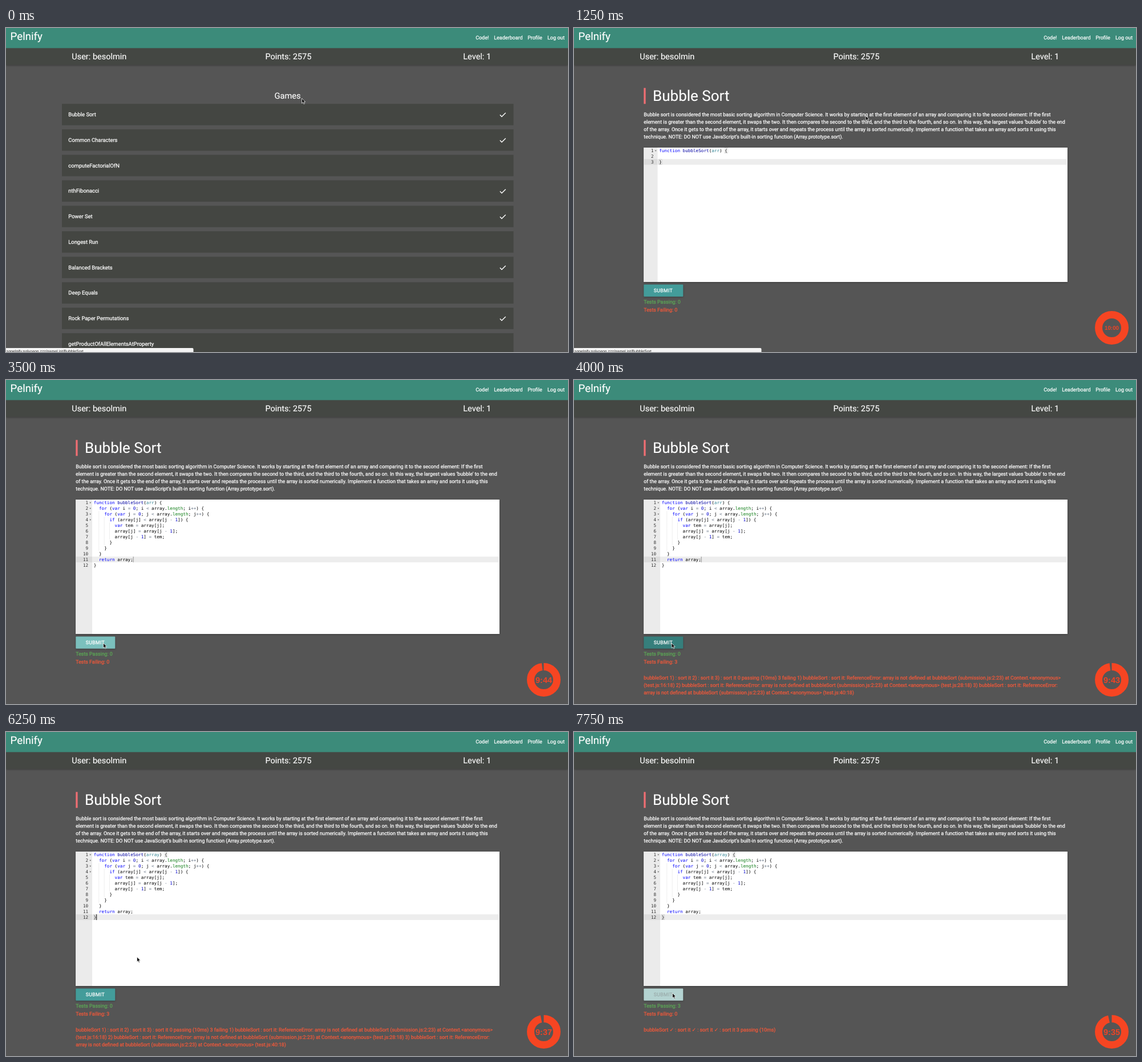
These frames come from a looping animation (985 px wide and 569 px high, 8000 ms). An HTML page:

```html
<!DOCTYPE html>
<html lang="en">
<head>
<meta charset="utf-8">
<title>Coding game</title>
<style>
html, body { margin: 0; width: 100%; height: 100%; overflow: hidden; background: #555; }
svg { display: block; width: 985px; height: 569px; }
text { white-space: pre; font-family: Roboto, sans-serif; fill: #fff; stroke: currentColor; stroke-width: .15px; text-rendering: geometricPrecision; }
.small { stroke-width: .25px; }
.code { font-family: "DejaVu Sans Mono", monospace; font-size: 7.65px; fill: #000; stroke: none; }
.num { fill: #333; text-anchor: end; }
.kw { fill: #00f; } .fn { fill: #0000a2; } .lit { fill: #0000cd; }
.prop { fill: #06780e; } .op { fill: #687687; } .arg { fill: #318495; }
.status { font-family: "Liberation Sans", Arial, sans-serif; font-size: 6.9px; fill: #222; stroke: none; }
.clock { font-family: "Liberation Sans", Arial, sans-serif; font-weight: bold; fill: #f04325; stroke: none; text-anchor: middle; }
.lift { filter: drop-shadow(0 1.2px 1.5px rgba(0,0,0,.3)); }
</style>
</head>
<body>
<svg viewBox="0 0 985 569">
  <g id="page"></g>
  <g id="bars"></g>
  <path id="mouse" d="M0 0V8.7L2 6.9L3.4 10L4.9 9.4L3.5 6.3H6.2Z" fill="#111" stroke="#fff" stroke-width=".7"/>
</svg>
<script>
const LOOP = 8000, TICK = 250;
const CHAR = 4.605, ROW = 10, TOP = 210.2;
const GREEN = '#5cab56', RED = '#f4593a';
const $ = id => document.getElementById(id);
const esc = s => s.replace(/&/g, '&amp;').replace(/</g, '&lt;');

const rect = (x, y, w, h, fill, more = '') =>
  `<rect x="${x}" y="${y}" width="${w}" height="${h}" fill="${fill}" ${more}/>`;
const text = (x, y, size, s, color = '#fff', more = '') =>
  `<text x="${x}" y="${y}" style="font-size:${size}px;fill:${color};color:${color}" ${more}>${esc(s)}</text>`;
const small = (x, y, size, s, color) => text(x, y, size, s, color, 'class="small"');
const block = (y, pitch, lines, color) =>
  lines.map((s, i) => small(122.3, y + i * pitch, 8.85, s, color)).join('');

const GAMES = ['Bubble Sort', 'Common Characters', 'computeFactorialOfN', 'nthFibonacci', 'Power Set',
  'Longest Run', 'Balanced Brackets', 'Deep Equals', 'Rock Paper Permutations',
  'getProductOfAllElementsAtProperty'];
const DONE = [0, 1, 3, 4, 6, 8];

const ABOUT = [
  'Bubble sort is considered the most basic sorting algorithm in Computer Science. It works by starting at the first element of an array and comparing it to the second element: If the first',
  'element is greater than the second element, it swaps the two. It then compares the second to the third, and the third to the fourth, and so on. In this way, the largest values ‘bubble’ to the end',
  'of the array. Once it gets to the end of the array, it starts over and repeats the process until the array is sorted numerically. Implement a function that takes an array and sorts it using this',
  'technique. NOTE: DO NOT use JavaScript’s built-in sorting function (Array.prototype.sort).'];

const FAIL = [
  'bubbleSort 1) : sort it 2) : sort it 3) : sort it 0 passing (10ms) 3 failing 1) bubbleSort : sort it: ReferenceError: array is not defined at bubbleSort (submission.js:2:23) at Context.<anonymous>',
  '(test.js:16:18) 2) bubbleSort : sort it: ReferenceError: array is not defined at bubbleSort (submission.js:2:23) at Context.<anonymous> (test.js:28:18) 3) bubbleSort : sort it: ReferenceError:',
  'array is not defined at bubbleSort (submission.js:2:23) at Context.<anonymous> (test.js:40:18)'];
const PASS = ['bubbleSort ✓ : sort it ✓ : sort it ✓ : sort it 3 passing (10ms)'];

const EMPTY = ['function bubbleSort(arr) {', '', '}'];
const BODY = [
  '  for (var i = 0; i < array.length; i++) {',
  '    for (var j = 0; j < array.length; j++) {',
  '      if (array[j] < array[j - 1]) {',
  '        var tem = array[j];',
  '        array[j] = array[j - 1];',
  '        array[j - 1] = tem;',
  '      }', '    }', '  }', '  return array;', '}'];

const BUTTON = {
  normal: ['#439c9a', '#fff'], hover: ['#7bc0bd', '#fff'],
  dark: ['#367f7c', '#fff'], pale: ['#b4d3d1', '#9bacab']
};

// [tick, value] lists: the last entry reached applies
const CLOCK = [[0, 600], [10, 586], [12, 585], [14, 584], [16, 583], [21, 582], [22, 580],
  [23, 579], [24, 578], [25, 577], [28, 576], [31, 575]];
const STATE = [[0, 'normal'], [14, 'hover'], [16, 'dark'], [22, 'normal'], [29, 'hover'], [31, 'pale']];
const LINE = [[0, 2], [10, 10], [22, 0], [24, 11]];
const CARET = [[0, 0], [10, .4], [22, 1], [28, 0]];
// [tick, x, y] of the pointer, moving in between
const PATH = [[0, 518.5, 123.5], [4, 510, 154.5], [5, 511, 154], [9, 511, 154], [10, 300, 380],
  [14, 170.5, 462], [16, 171, 462], [19, 186, 494.5], [20, 186, 494.5], [22, 256, 218],
  [23, 256, 218], [25, 229.5, 395], [26, 229.5, 395], [29, 172.5, 458.5], [31, 172.5, 458.5]];

const pick = (list, n) => list.filter(e => e[0] <= n).pop()[1];

function pointer(n) {
  let i = 0;
  while (i < PATH.length - 2 && PATH[i + 1][0] <= n) i++;
  const [a, x, y] = PATH[i], [b, u, v] = PATH[i + 1];
  const k = Math.min(1, (n - a) / (b - a)), e = k * k * (3 - 2 * k);
  return [x + (u - x) * e, y + (v - y) * e];
}

function paint(line) {
  const kinds = ['kw', 'fn', 'lit', 'prop', 'op', 'arg'];
  const rule = /\b(function|for|var|if|return)\b|(bubbleSort)|(\d+)|(length)|([=<+-]+)|((?<=\()arr(?:ay)?(?=\)))/g;
  return line.replace(rule, (word, ...m) =>
    `<tspan class="${kinds[m.slice(0, 6).findIndex(Boolean)]}">${esc(word)}</tspan>`);
}

function editor(lines, active, caret) {
  const wide = lines.length > 9 ? CHAR : 0, left = 149.2 + wide;
  const rowY = r => TOP + r * ROW;
  let s = rect(122.3, 210, 742.6, 236, '#fff', 'class="lift"') +
    rect(122.3, 210, 24.2 + wide, 236, '#ebebeb') +
    rect(122.3, rowY(active), 24.2 + wide, ROW, '#dcdcdc') +
    rect(146.5 + wide, rowY(active), 718.4 - wide, ROW, '#ededed');
  lines.forEach((line, r) => {
    const y = rowY(r), depth = line.search(/\S/) / 2;
    for (let d = 1; d < depth; d++) s += rect(left + d * 2 * CHAR - .4, y, .5, ROW, '#ddd');
    s += `<text class="code num" x="${139.6 + wide}" y="${y + 7.8}">${r + 1}</text>`;
    if (line.endsWith('{')) s += `<path d="M${141.7 + wide} ${y + 4.6}h3l-1.5 1.9z" fill="#666"/>`;
    s += `<text class="code" x="${left}" y="${y + 7.8}">${paint(line)}</text>`;
  });
  if (active === lines.length - 1) {
    const box = (r, c) => rect(left + c * CHAR - .3, rowY(r) + .5, CHAR + .5, 9, 'none', 'stroke="#c0c0c0" stroke-width=".6"');
    s += box(0, lines[0].length - 1) + box(active, 0);
  }
  const col = active ? lines[active].length : lines[0].indexOf(')');
  return s + rect(left + col * CHAR - .2, rowY(active), 1, ROW, '#000', `opacity="${caret}"`);
}

function timer(sec) {
  const r = 23, len = 2 * Math.PI * r, on = len * sec / 600;
  const label = Math.floor(sec / 60) + ':' + String(sec % 60).padStart(2, '0');
  const size = label.length > 4 ? 9.8 : 14.4;
  return `<circle cx="942.5" cy="526.5" r="${r}" fill="none" stroke="#f64522" stroke-width="13"
    stroke-dasharray="${on} ${len}" transform="rotate(-90 942.5 526.5)"/>` +
    `<text class="clock" x="942.5" y="${526.5 + size * .36}" font-size="${size}">${label}</text>`;
}

function menu() {
  return text(470.6, 124.4, 14.6, 'Games') + GAMES.map((name, i) => {
    const y = 133.2 + i * 44.75;
    return rect(98, y, 791.5, 37.6, '#444642') + small(109.3, y + 22, 9.4, name) +
      (DONE.includes(i) ? `<path d="M865.8 ${y + 19.4}l3.1 3.1l6.8 -6.8" fill="none" stroke="#fff" stroke-width="1.4"/>` : '');
  }).join('');
}

function game(n) {
  const lines = n < 10 ? EMPTY : [`function bubbleSort(${n < 23 ? 'arr' : 'array'}) {`, ...BODY];
  const [fill, ink] = BUTTON[pick(STATE, n)];
  const failed = n >= 16 && n < 31, passed = n >= 31;
  return rect(122.3, 105.3, 3.3, 28, '#ee6e73') + text(138, 128.3, 26, 'Bubble Sort') +
    block(155.2, 12.87, ABOUT, '#fff') +
    editor(lines, pick(LINE, n), pick(CARET, n)) +
    rect(122.3, 450.4, 69, 21.4, fill, 'rx="1" class="lift"') +
    text(139.8, 464.2, 8.75, 'SUBMIT', ink, 'letter-spacing=".28" class="small"') +
    small(122.3, 484.3, 8.85, 'Tests Passing: ' + (passed ? 3 : 0), GREEN) +
    small(122.3, 497.8, 8.85, 'Tests Failing: ' + (failed ? 3 : 0), RED) +
    block(525.5, 13, failed ? FAIL : passed ? PASS : [], RED) +
    timer(pick(CLOCK, n));
}

function header(n) {
  const links = [[823.2, 'Code!'], [855.3, 'Leaderboard'], [914.2, 'Profile'], [949, 'Log out']];
  let s = rect(0, 35, 985, 30, '#444743', 'class="lift"') + rect(0, 0, 985, 35.3, '#3c8b7a') +
    text(7.6, 20.8, 18.7, 'Pelnify') +
    links.map(([x, t]) => small(x, 19.5, 8.95, t)).join('') +
    text(115.3, 55.3, 14.5, 'User: besolmin') +
    text(454.5, 55.3, 14.5, 'Points: 2575') +
    text(801.3, 55.3, 14.5, 'Level: 1');
  if (n < 6) s += rect(-4, 562, 332.5, 12, '#f4f4f4', 'rx="2"') +
    '<text class="status" x="1" y="569.6">sgpelnify.nolvoapp.zzz/gameList/BubbleSort</text>';
  return s;
}

let shown = -1;
function draw(now) {
  const n = Math.floor(now % LOOP / TICK);
  if (n !== shown) {
    shown = n;
    $('page').innerHTML = n < 5 ? menu() : game(n);
    $('bars').innerHTML = header(n);
    $('mouse').setAttribute('transform', `translate(${pointer(n)})`);
  }
  requestAnimationFrame(frame);
}

let start;
function frame(now) {
  start ??= now;
  draw(now - start);
}
draw(0);
</script>
</body>
</html>
```
